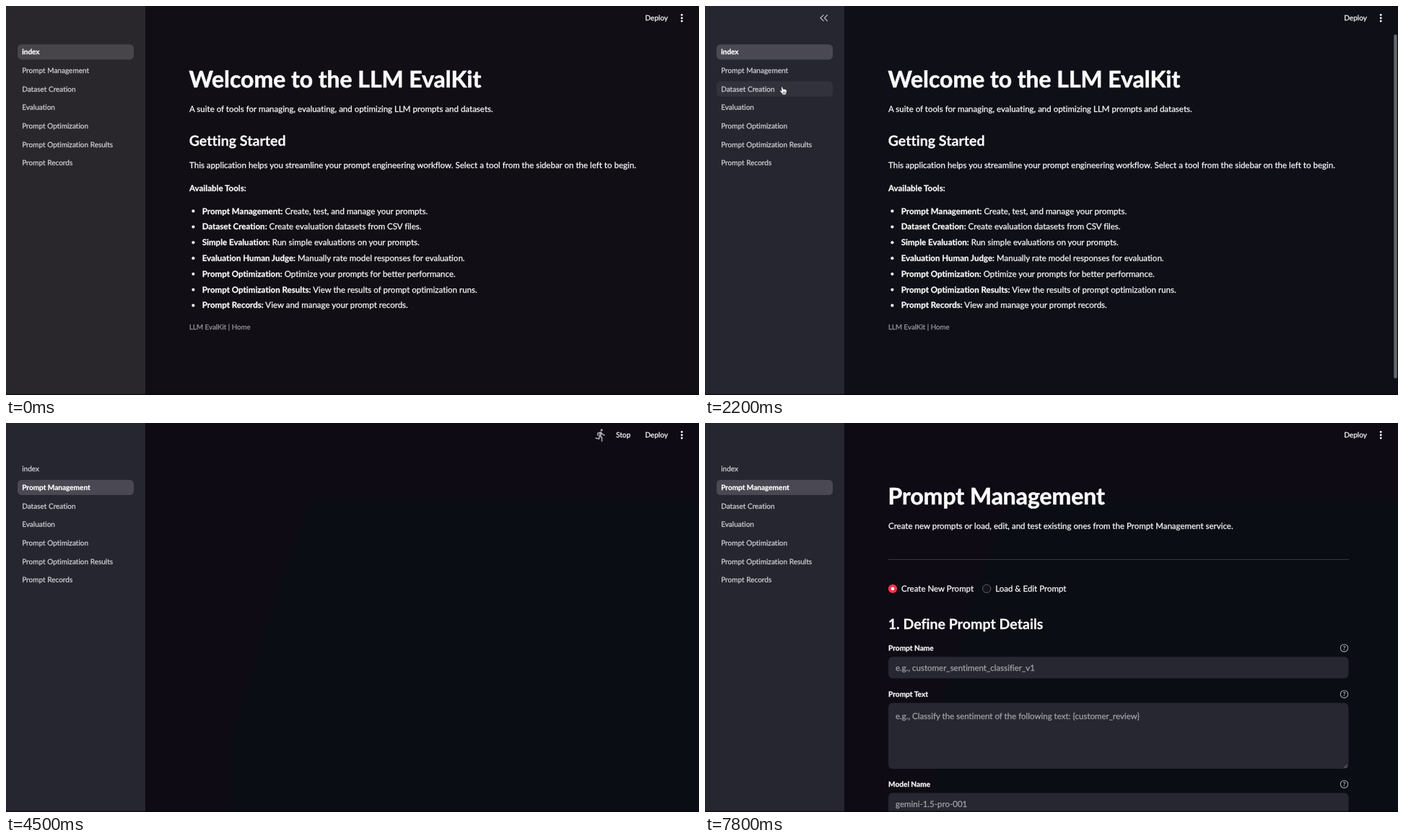
Write an HTML page that moves like this. It is 960 px wide and 540 px high and loops after 8000 ms.

```html
<!DOCTYPE html>
<html lang="en">
<head>
<meta charset="utf-8">
<title>LLM EvalKit</title>
<style>
  html, body { margin: 0; width: 100%; height: 100%; overflow: hidden; background: #0f0e16; }
  svg { display: block; width: 960px; height: 540px; }
  text {
    font: 400 11.53px Lato, "Open Sans", sans-serif; font-variant-ligatures: none; text-rendering: geometricPrecision;
    color: #fafafa; fill: currentColor; stroke: currentColor; stroke-width: 0.25px;
  }
  .h1 { font-size: 31.9px; font-weight: 700; stroke-width: 0.6px; }
  .h2 { font-size: 19.6px; font-weight: 700; }
  .bold { font-size: 11.55px; font-weight: 700; }
  .label { font-size: 10.15px; font-weight: 700; }
  .nav { font-size: 10.04px; color: #cfcfd4; }
  .nav.on { font-weight: 700; color: #fff; }
  .small { font-size: 9.75px; color: #98989f; }
  .bar { font-size: 10.15px; }
  .hint { color: #a2a2a8; }
  .mark { font-size: 8px; font-weight: 700; color: #a2a2a8; text-anchor: middle; }
</style>
</head>
<body>
<svg id="stage" viewBox="0 0 960 540" xmlns="http://www.w3.org/2000/svg"></svg>
<script>
const LOOP = 8000, STEP = 100;
const CLICK = 2500, CURSOR_ON = 100, CURSOR_OFF = 3100, RUN = 3100, LOADED = 7800;
const SIDEBAR = 193, ROW_TOP = 53.2, ROW = 25.7;
const stage = document.getElementById('stage');

function add(parent, tag, attrs = {}, content) {
  const node = document.createElementNS('http://www.w3.org/2000/svg', tag);
  for (const key in attrs) node.setAttribute(key, attrs[key]);
  if (content) node.textContent = content;
  parent.appendChild(node);
  return node;
}
const group = (parent = stage) => add(parent, 'g');
const text = (parent, x, y, content, cls = '') => add(parent, 'text', { x, y, class: cls }, content);
const rect = (parent, x, y, width, height, fill, rx = 0) =>
  add(parent, 'rect', { x, y, width, height, fill, rx });
const circle = (parent, cx, cy, r, fill, stroke = 'none', width = 1) =>
  add(parent, 'circle', { cx, cy, r, fill, stroke, 'stroke-width': width });
const path = (parent, d, fill, stroke = 'none', width = 1) =>
  add(parent, 'path', { d, fill, stroke, 'stroke-width': width, 'stroke-linecap': 'round', 'stroke-linejoin': 'round' });
const show = (node, on) => node.setAttribute('visibility', on ? 'inherit' : 'hidden');

// Backdrop and sidebar
const main = rect(stage, 0, 0, 960, 540, '#110e15');
const tint = path(stage, 'M425 105H960V540H315V425L390 185z', '#0a0d13');
const side = rect(stage, 0, 0, SIDEBAR, 540, '#29272c');
const hover = rect(stage, 16, 0, 161, 21.2, '#32323c', 5.5);
const active = rect(stage, 16, ROW_TOP, 161, 21.2, '#47454a', 5.5);
const links = ['index', 'Prompt Management', 'Dataset Creation', 'Evaluation',
  'Prompt Optimization', 'Prompt Optimization Results', 'Prompt Records']
  .map((name, i) => text(stage, 22.2, 67.2 + ROW * i, name, 'nav'));
const collapse = path(stage, 'M164 12.6l-4 4 4 4M169.4 12.6l-4 4 4 4', 'none', '#c4c4ca', 1.3);

// Home page
const home = group();
text(home, 253.5, 112.6, 'Welcome to the LLM EvalKit', 'h1');
text(home, 254, 147.3, 'A suite of tools for managing, evaluating, and optimizing LLM prompts and datasets.');
text(home, 253.7, 194, 'Getting Started', 'h2');
text(home, 254, 225.4, 'This application helps you streamline your prompt engineering workflow. Select a tool from the sidebar on the left to begin.');
text(home, 254, 257, 'Available Tools:', 'bold');
[
  ['Prompt Management:', 'Create, test, and manage your prompts.'],
  ['Dataset Creation:', 'Create evaluation datasets from CSV files.'],
  ['Simple Evaluation:', 'Run simple evaluations on your prompts.'],
  ['Evaluation Human Judge:', 'Manually rate model responses for evaluation.'],
  ['Prompt Optimization:', 'Optimize your prompts for better performance.'],
  ['Prompt Optimization Results:', 'View the results of prompt optimization runs.'],
  ['Prompt Records:', 'View and manage your prompt records.']
].forEach(([name, note], i) => {
  const y = 288.5 + 21.83 * i;
  circle(home, 259.4, y - 3.8, 2.1, '#fafafa');
  const line = text(home, 271.7, y);
  add(line, 'tspan', { class: 'bold' }, name);
  add(line, 'tspan', {}, ' ' + note);
});
text(home, 254, 449, 'LLM EvalKit | Home', 'small');
const scrollbar = rect(home, 954.3, 39.5, 4.4, 477.5, '#67686d', 2.2);

// Prompt form
const form = group();
function field(name, y, height, hint) {
  text(form, 254, y, name, 'label');
  circle(form, 885.5, y - 3.6, 5.2, 'none', '#a2a2a8', 1.1);
  text(form, 885.5, y - 0.7, '?', 'mark');
  rect(form, 254, y + 8.4, 637.5, height, '#262730', 6);
  text(form, 264, y + (height > 60 ? 30.5 : 28), hint, 'hint');
}
text(form, 253.5, 112.6, 'Prompt Management', 'h1');
text(form, 254, 147.3, 'Create new prompts or load, edit, and test existing ones from the Prompt Management service.');
rect(form, 254, 189, 638, 1, '#35363e');
circle(form, 260, 230, 6.1, '#f9364d');
circle(form, 260, 230, 2.3, '#fff');
text(form, 272, 234.2, 'Create New Prompt');
circle(form, 390.2, 230, 5.7, '#14141c', '#5c5d66');
text(form, 402.2, 234.2, 'Load & Edit Prompt');
text(form, 253.7, 286, '1. Define Prompt Details', 'h2');
field('Prompt Name', 316, 30, 'e.g., customer_sentiment_classifier_v1');
field('Prompt Text', 380, 91.5, 'e.g., Classify the sentiment of the following text: {customer_review}');
field('Model Name', 505, 30, 'gemini-1.5-pro-001');
path(form, 'M885.5 478.5l4-4M888.2 478.5l1.3-1.3', 'none', '#a2a2a8', 0.7);

// Top bar
text(stage, 885.2, 20.3, 'Deploy', 'bar');
[12.4, 16.7, 21].forEach(y => circle(stage, 936.2, y, 1.45, '#fafafa'));
const status = group();
text(status, 845, 20.3, 'Stop', 'bar');

// Activity figures, drawn on a 24-unit grid
const GREY = '#a3a3aa';
const figures = [
  g => {
    circle(g, 16.5, 5.5, 2.3, GREY);
    path(g, 'M9 6l7 7M9 6L5 10M2 16q3.3 3 6.6 0t6.6 0 6.6 0M2 20.5q3.3 3 6.6 0t6.6 0 6.6 0', 'none', GREY, 2);
  },
  g => {
    circle(g, 12, 4, 2, GREY);
    path(g, 'M20.5 6c-2.61.7-5.67 1-8.5 1s-5.89-.3-8.5-1L3 8c1.86.5 4 .83 6 1v13h2v-6h2v6h2V9c2-.17 4.14-.5 6-1z', GREY);
  },
  g => {
    circle(g, 8, 5, 2, GREY);
    path(g, 'M9 9l3 5h5l-2 6M12 14l9-8M3 17l9-5M2 21h20', 'none', GREY, 2);
  },
  g => {
    circle(g, 13.49, 3.48, 2, GREY);
    path(g, 'M9.89 19.38l1-4.4 2.1 2v6h2v-7.5l-2.1-2 .6-3c1.3 1.5 3.3 2.5 5.5 2.5v-2c-1.9 0-3.5-1-4.3-2.4l-1-1.6c-.4-.6-1-1-1.7-1-.3 0-.5.1-.8.1l-5.2 2.2v4.7h2v-3.4l1.8-.7-1.6 8.1-4.9-1-.4 2z', GREY);
  },
  g => {
    circle(g, 15.5, 3.5, 2, GREY);
    circle(g, 5, 17, 4.2, 'none', GREY, 1.5);
    circle(g, 19, 17, 4.2, 'none', GREY, 1.5);
    path(g, 'M19 10q-3 0-5-2.4L12.2 6 8.4 9.8 12 13.3V18', 'none', GREY, 2);
  },
  g => {
    circle(g, 13.5, 3.5, 2, GREY);
    path(g, 'M12.5 8l-2 6 3 3v5M10.5 14l-3 8M12.5 8l-4 2-1 3.5M12.5 8l2 3 4 1', 'none', GREY, 2);
  }
].map(draw => {
  const g = group(status);
  g.setAttribute('transform', 'translate(814 7) scale(.82)');
  draw(g);
  return g;
});

rect(stage, 0, 538.6, 960, 1.4, 'rgba(0,0,0,.6)');

// Pointer shapes, hot spot at 0,0
const pointer = group();
const shapes = { beam: group(pointer), arrow: group(pointer), hand: group(pointer) };
const beam = 'M-2.4-5q2.4 0 2.4 1.6V3.6q0 1.6-2.4 1.6M2.4-5Q0-5 0-3.4M0 3.6q0 1.6 2.4 1.6M-1.2 1.6h2.4';
path(shapes.beam, beam, 'none', '#17171d', 2.2);
path(shapes.beam, beam, 'none', '#b9b9bd', 1);
path(shapes.arrow, 'M0 0v11l2.6-2.4 1.8 4.1 2-.9-1.8-3.9h3.5z', '#0a0a0d', '#fff', 0.9);
path(shapes.hand, 'M-1.4-3.8q1.2-.8 1.8.7L1.4-.6q1.2-.9 1.8.3 1.2-.7 1.6.5 1.3-.4 1.4 1.1.2 3-1.1 4.6v1.3H-.2V5.8L-3.7 2q-.2-1.6 1.5-.9l.8.7z', '#fff', '#1a1a20', 0.8);
path(shapes.hand, 'M1.2 3v2.3M2.6 3v2.3M4 3v2.3', 'none', '#33333a', 0.6);

// time, x, y
const track = [
  [100, 640, 490], [800, 321, 366], [1700, 321, 366],
  [2300, 90, 96], [2700, 90, 96], [3000, 258, 474]
];
function pointerAt(t) {
  let i = 0;
  while (i < track.length - 2 && t >= track[i + 1][0]) i++;
  const [t0, x0, y0] = track[i], [t1, x1, y1] = track[i + 1];
  const p = Math.min(1, Math.max(0, (t - t0) / (t1 - t0)));
  const e = p * p * (3 - 2 * p);
  return [x0 + (x1 - x0) * e, y0 + (y1 - y0) * e];
}

function render(time) {
  const t = Math.floor(time % LOOP / STEP) * STEP;
  const clicked = t >= CLICK, warm = t < 1100;
  const [x, y] = pointerAt(t);
  const visible = t >= CURSOR_ON && t < CURSOR_OFF;
  const inSide = visible && x < SIDEBAR;
  const row = Math.floor((y - ROW_TOP) / ROW);
  const overLink = inSide && x > 16 && x < 177 && row >= 0 && row < links.length;
  const current = clicked ? 1 : 0;

  main.setAttribute('fill', clicked ? '#0f0b14' : warm ? '#110e15' : '#0f0f17');
  show(tint, clicked);
  side.setAttribute('fill', warm ? '#29272c' : '#262630');
  active.setAttribute('y', ROW_TOP + ROW * current);
  active.setAttribute('fill', overLink && row === current ? '#3b3a44' : warm ? '#47454a' : '#494853');
  hover.setAttribute('y', ROW_TOP + ROW * row);
  show(hover, overLink && row !== current);
  links.forEach((link, i) => link.classList.toggle('on', i === current));
  show(collapse, inSide);

  show(home, !clicked);
  show(scrollbar, !clicked && t >= 200);
  show(form, t >= LOADED);

  const running = t >= RUN && t < LOADED;
  const pose = Math.floor((t - RUN + 400) / 200) % figures.length;
  show(status, running);
  figures.forEach((g, i) => show(g, running && i === pose));

  show(pointer, visible);
  pointer.setAttribute('transform', `translate(${x} ${y})`);
  const overText = !clicked && x > 254 && x < 880 && y > 80 && y < 455;
  const shape = overLink ? 'hand' : overText ? 'beam' : 'arrow';
  for (const key in shapes) show(shapes[key], visible && key === shape);
}

const start = performance.now();
(function tick() {
  render(performance.now() - start);
  requestAnimationFrame(tick);
})();
</script>
</body>
</html>
```
